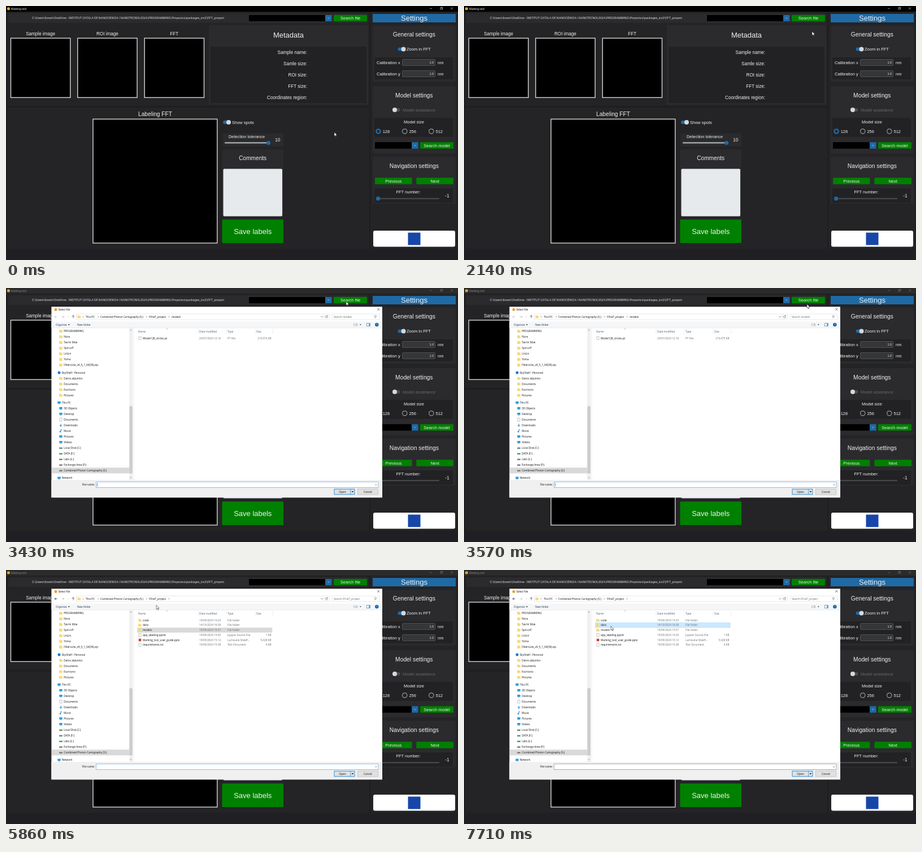
These frames come from a looping animation (800 px wide and 450 px high, 8000 ms). An HTML page:

```html
<!DOCTYPE html>
<html lang="en">
<head>
<meta charset="utf-8">
<title>File selection demo</title>
<style>
html, body { margin: 0; width: 100%; height: 100%; overflow: hidden; background: #1e1e20; }
svg { display: block; width: 800px; height: 450px; }
text { font-family: "Liberation Sans", Arial, sans-serif; white-space: pre; }
.path { font-family: Roboto, sans-serif; }
.dlg text { font-family: "Open Sans", "Noto Sans", sans-serif; }
</style>
</head>
<body>
<svg id="stage" viewBox="0 0 800 450"></svg>
<script>
const ROOT = '#1e1e20', FRAME = '#242426', CARD = '#2b2a2d', INSET = '#222225';
const GREEN = '#008000', BLUE = '#1f6aa5', HOVER = '#144870', ACCENT = '#0078d7', FOCUS = '#5ea9e2';
const LOOP = 8000, STEP = 1000 / 7;

// Shape helpers; edges are given as left, top, right, bottom.
const rect = (l, t, r, b, fill, extra = '') =>
  `<rect x="${l}" y="${t}" width="${r - l}" height="${b - t}" fill="${fill}" ${extra}/>`;
const round = (l, t, r, b, fill, rx = 1.5, extra = '') => rect(l, t, r, b, fill, `rx="${rx}" ${extra}`);
const boxed = (l, t, r, b, fill, stroke, w = 0.6, extra = '') =>
  rect(l, t, r, b, fill, `stroke="${stroke}" stroke-width="${w}" ${extra}`);
const dot = (x, y, r, fill, extra = '') => `<circle cx="${x}" cy="${y}" r="${r}" fill="${fill}" ${extra}/>`;
const line = (d, stroke, w = 0.6) => `<path d="${d}" fill="none" stroke="${stroke}" stroke-width="${w}"/>`;
const label = (x, y, s, size = 7.5, anchor = 'start', fill = '#f0f0f0', extra = '') =>
  `<text x="${x}" y="${y}" font-size="${size}" text-anchor="${anchor}" fill="${fill}" ${extra}>${s}</text>`;
const mid = (x, y, s, size, fill) => label(x, y, s, size, 'middle', fill);
const group = (id, body, extra = '') => `<g id="${id}" ${extra}>${body}</g>`;
const chevron = (x, y, stroke, w = 0.7, s = 1.6) => line(`M${x - s} ${y - s / 2}l${s} ${s}l${s} ${-s}`, stroke, w);

const button = (l, t, r, b, s, size = 7.5, extra = '') =>
  round(l, t, r, b, GREEN, 1.5, extra) + mid((l + r) / 2, (t + b) / 2 + size * 0.36, s, size);
const combo = (l, t, r, b) =>
  rect(l, t, r - 11.5, b, '#000') + rect(r - 11.5, t, r, b, BLUE) + chevron(r - 5.7, (t + b) / 2, '#dce4ee');
const toggle = (x, y, on) =>
  round(x, y - 3, x + 13, y + 3, on ? BLUE : '#4a4d50', 3) + dot(on ? x + 10 : x + 3.5, y, 4, '#d5d9de');
const imageBox = (l, t, r, b) => boxed(l, t, r, b, '#000', '#d8d8d8', 1.4);
const radio = (x, s, on) =>
  dot(x, 222, on ? 3.6 : 4.2, 'none', `stroke="${on ? BLUE : '#949a9f'}" stroke-width="${on ? 2.4 : 1.2}"`) +
  label(x + 7.7, 224.7, s);

function titleBar() {
  return rect(0, 0, 800, 10, '#000', 'id="bar"') + dot(4.5, 4.8, 2.6, '#f0a020') +
    group('title', label(9, 6.7, 'Marking tool', 5, 'start', 'currentColor') +
      line('M750 4.5h4M768.7 3.2h3v3h-3zM769.7 3.2v-1h3v3h-1M787 2.3l4 4M791 2.3l-4 4', 'currentColor', 0.5));
}

function leftSide() {
  const path = 'C:\\Users\\ltoveri\\OneDrive - INSTITUT CATALA DE NANOCIENCIA I NANOTECNOLOGIA' +
    '\\PROGRAMMING\\Proyectos\\packages_icn2\\FFT_proyect';
  let s = round(2, 11, 643, 177, FRAME, 2) + round(2, 180, 643, 430, FRAME, 2) +
    round(4, 13, 641, 30, CARD, 2) + label(46, 23.4, path, 5.35, 'start', '#dedede', 'class="path"') +
    combo(430, 16, 576.5, 27) + button(580, 15.7, 639, 27.3, 'Search file', 7.5, 'id="search"');

  [['Sample image', 8.5], ['ROI image', 126.8], ['FFT', 245.2]].forEach(([name, x]) => {
    s += mid(x + 52.6, 51.7, name, 8.15) + imageBox(x, 57, x + 105.3, 162.2);
  });

  s += round(359, 34, 641, 175, CARD, 2) + rect(362, 72, 638, 172, INSET) + mid(500, 56.2, 'Metadata', 13);
  ['Sample name:', 'Samle size:', 'ROI size:', 'FFT size:', 'Coordinates region:'].forEach((name, i) => {
    s += label(533, 84.7 + 20 * i, name, 8.15, 'end');
  });

  return s + mid(264, 195, 'Labeling FFT', 10.2) + imageBox(154, 200.4, 373.8, 420) +
    toggle(384, 206, true) + label(400, 208.6, 'Show spots') +
    round(383, 226, 491, 248.5, CARD) + mid(426, 234, 'Detection tolerance', 7.45) +
    round(387, 241.3, 468, 243.5, '#aab0b5', 1) + dot(464.5, 242.5, 3.6, BLUE) + mid(480.8, 239.8, '10', 8.2) +
    round(382.5, 254, 491, 374, CARD) + mid(436.7, 273.4, 'Comments', 10.15) +
    round(384.5, 288.6, 489, 372.5, '#e6eaec', 2) +
    button(382.5, 378.3, 491, 420, 'Save labels', 13);
}

function rightSide() {
  const heading = (y, s) => mid(722.3, y, s, 10.3);
  const entry = (y, axis) => label(656, y + 2.5, 'Calibration ' + axis) +
    boxed(701.5, y - 5.5, 759.5, y + 5.5, '#343638', '#565b5e', 0.8, 'rx="1.5"') +
    label(757, y + 2, '1.0', 5.4, 'end') + label(764, y + 2.5, 'nm');
  return rect(645, 11, 799, 430, FRAME) + rect(649, 14, 796, 29, BLUE) + mid(722.5, 25.8, 'Settings', 13) +
    round(649, 35, 796, 134, CARD, 2) + heading(54.4, 'General settings') +
    toggle(693.5, 76.5, true) + label(709, 79.2, 'Zoom in FFT') +
    round(652, 91, 791, 130, INSET) + entry(100, 'x') + entry(120, 'y') +
    round(649, 142, 796, 261, CARD, 2) + heading(161.7, 'Model settings') +
    toggle(684.5, 184, false) + label(702, 186.7, 'Model assistance', 7.5, 'start', '#68686b') +
    round(652, 198, 791, 232, INSET) + mid(722, 208, 'Model size') +
    radio(659, '128', true) + radio(705.7, '256') + radio(752.8, '512') +
    combo(653, 241.3, 729.5, 252.7) + button(733, 241.3, 792, 252.7, 'Search model') +
    round(649, 267, 796, 350, CARD, 2) + heading(286.7, 'Navigation settings') +
    button(653, 304.3, 718.5, 315.7, 'Previous') + button(726.3, 304.3, 792, 315.7, 'Next') +
    round(652, 323, 791, 348.5, INSET) + mid(712, 332.4, 'FFT number:') +
    round(655, 340.2, 767, 342.2, '#4a4d50', 1) + dot(658.5, 341.2, 3.6, BLUE) + mid(781, 338.8, '-1', 8.2) +
    round(650, 398, 795, 426.5, '#fff', 3) + rect(711.5, 401.5, 733.5, 423.5, '#1746a8');
}

// File dialog
const txt = (x, y, s, fill = '#111', anchor = 'start') => label(x, y + 1.7, s, 4.7, anchor, fill);
const folder = (x, y) => `<path d="M${x - 2.8} ${y - 2.6}h2.2l.8 .8h2.6v4.4h-5.6z" fill="#f9d877"/>`;
const page = (x, y) => boxed(x - 2, y - 2.7, x + 2, y + 2.7, '#fff', '#8c8c8c', 0.5);
const drive = (x, y) => rect(x - 2.8, y - 0.8, x + 2.8, y + 1.6, '#777') + rect(x - 2.8, y + 0.6, x + 2.8, y + 1.3, '#3fae63');
const screen = (x, y) => rect(x - 2.7, y - 2.2, x + 2.7, y + 1.5, '#2b9bd8') + rect(x - 1.5, y + 2, x + 1.5, y + 2.5, '#666');

function tree() {
  let s = rect(81, 318.2, 218, 328.4, '#d9d9d9');
  const branch = (names, y, icon) => names.forEach((name, i) => {
    s += icon(97, y + 10 * i) + txt(102.3, y + 10 * i, name);
  });
  const root = (name, y, icon) => { s += icon + txt(98.8, y, name); };
  branch(['PROGRAMMING', 'Nora', 'Tavrin Moe', 'Spin-off', 'LinLin', 'Yoma', 'FiltersLite_v4_5_1_64(36).zip'], 76.4, folder);
  root('SkyShelf - Personal', 150, dot(94, 150, 2.5, '#1879d0'));
  branch(['Datos adjuntos', 'Documents', 'Escritorio', 'Pictures'], 160, folder);
  root('This PC', 203.2, screen(94, 203.2));
  branch(['3D Objects', 'Desktop'], 213.2, screen);
  branch(['Documents'], 233.2, page);
  branch(['Downloads'], 243.2, (x, y) => line(`M${x} ${y - 2.5}v4.5m-2 -2l2 2l2 -2`, ACCENT, 1));
  branch(['Music'], 253.2, (x, y) => dot(x - 1, y + 1.4, 1.2, ACCENT) + line(`M${x} ${y + 1.4}v-4l2 1`, ACCENT, 0.8));
  branch(['Pictures', 'Videos'], 263.2, screen);
  branch(['Local Disk (C:)', 'DATA (F:)', 'Labs (L:)', 'Exchange Area (P:)', 'Combined Photon Cartography (S:)'], 283.3, drive);
  root('Network', 336.7, screen(94, 336.7));
  return s + rect(218, 71, 224.3, 340, '#f0f0f0') + rect(218.3, 209.5, 224, 328.5, '#cdcdcd') +
    chevron(221.2, 336, '#555', 0.7, 1.3) + line('M219.9 75.2l1.3 -1.3l1.3 1.3', '#555', 0.7) + line('M226 71v269', '#e2e2e2');
}

function fileRow(y, icon, name, date, type, size = '') {
  const gray = '#6d6d6d';
  return icon(237, y) + txt(242, y, name) + txt(342, y, date, gray) + txt(392, y, type, gray) + txt(469.5, y, size, gray, 'end');
}

function listings() {
  const rowY = i => 89 + 8.75 * i;
  const mark = (id, i, fill, stroke) => group(id, boxed(232.3, rowY(i) - 4.2, 471, rowY(i) + 4.2, fill, stroke, 0.5));
  const slides = (x, y) => rect(x - 2.3, y - 2.3, x + 2.3, y + 2.3, '#c9472b');
  const rows = [
    [folder, 'code', '19/09/2024 14:25', 'File folder'],
    [folder, 'data', '14/10/2024 16:58', 'File folder'],
    [folder, 'models', '19/09/2024 15:57', 'File folder'],
    [page, 'app_labeling.ipynb', '19/09/2024 14:30', 'Jupyter Source File', '1 KB'],
    [slides, 'Marking_tool_user_guide.pptx', '19/09/2024 15:12', 'Lumivane SlideP...', '5,428 KB'],
    [page, 'requirements.txt', '19/09/2024 15:38', 'Text Document', '4 KB']
  ];
  const search = s => txt(580, 51.2, 'Search ' + s, '#6d6d6d');
  const before = fileRow(89, page, 'Model128_circles.pt', '24/07/2024 12:16', 'PT File', '215,475 KB') +
    txt(293, 51, 'models') + search('models');
  const after = mark('hoverCode', 0, '#e7f5f6', '#d3ecee') + mark('hoverData', 1, '#e5f3ff', '#d5ebff') +
    mark('pickModels', 2, '#d9d9d9', '#d9d9d9') + mark('pickData', 1, '#cce8ff', '#99d1ff') +
    rows.map((r, i) => fileRow(rowY(i), ...r)).join('') + search('FFneT_project');
  return group('before', before) + group('after', after + line('M90.5 51h-4.5m2 -2l-2 2l2 2', '#333', 0.7));
}

function dialog() {
  const crumb = x => line(`M${x - 0.7} 49.6l1.4 1.4l-1.4 1.4`, '#555', 0.6);
  const head = [['Name', 234], ['Date modified', 342], ['Type', 392], ['Size', 443]];
  return rect(80.4, 33.2, 665.9, 371.2, '#fff') +
    dot(88, 38.3, 2.5, '#f0a020') + txt(92.5, 38.2, 'Select file') + line('M657.3 35.8l4 4M661.3 35.8l-4 4', '#222', 0.6) +
    line('M86 51h4.5M88 49l-2 2l2 2M98.5 51h4.5m-2 -2l2 2l-2 2', '#b5b5b5', 0.7) + chevron(110, 51, '#aaa', 0.6, 1.2) +
    line('M119 53.5v-5m-2 2l2 -2l2 2', '#333', 0.7) +
    boxed(124.5, 46, 572.5, 56, '#fff', '#d9d9d9') + boxed(577, 46, 661, 56, '#fff', '#d9d9d9') +
    group('hoverCrumb', boxed(250.8, 46.4, 291.2, 55.6, '#e5f3ff', '#cce8ff') + line('M285.8 46.4v9.2', '#cce8ff')) +
    folder(129.3, 51) + [136.5, 163, 248.5, 288.5].map(crumb).join('') +
    txt(141, 51, 'This PC') + txt(167, 51, 'Combined Photon Cartography (S:)') + txt(253, 51, 'FFneT_project') +
    chevron(559.3, 51, '#444') + line('M563.3 46v10', '#d9d9d9') + line('M569 49.7a2 2 0 1 0 .4 1.8M569.3 48.5v1.6h-1.6', '#444') +
    line('M655.4 50.2a1.6 1.6 0 1 0 -.01 .1M654.8 51.5l-2 2', '#555') +
    rect(80.4, 59.5, 665.9, 70.5, '#f5f6f7') + line('M81 70.7h584', '#dcdcdc') +
    txt(88, 65, 'Organize', '#1e395b') + '<path d="M109.5 64.3h3.6l-1.8 2z" fill="#333"/>' + txt(126, 65, 'New folder', '#1e395b') +
    line('M615 63.3h2M618.3 63.3h4M615 65h2M618.3 65h4M615 66.7h2M618.3 66.7h4', '#888') +
    '<path d="M625.8 64.3h3l-1.5 1.8z" fill="#333"/>' + boxed(638.3, 62.7, 644.3, 67.4, '#fff', '#1b6fb5') +
    rect(642, 62.7, 644.3, 67.4, '#5ea5dc') + dot(656.3, 65, 3.2, '#0a64b4') + mid(656.3, 66.8, '?', 5, '#fff') +
    tree() + head.map(([s, x]) => txt(x, 76.8, s, '#4c607a')).join('') +
    line('M340 72v9.5M390 72v9.5M441 72v9.5M472.3 72v9.5', '#e2e2e2') + line('M283.4 73l1.5 -1.3l1.5 1.3', '#777', 0.5) +
    listings() + rect(80.4, 340, 665.9, 371.2, '#f0f0f0') + txt(157, 348.5, 'File name:', '#111', 'end') +
    boxed(159.3, 343.7, 659, 353.4, '#fff', FOCUS, 0.7, 'id="field"') + chevron(655, 348.6, '#444') +
    group('caret', line('M161.5 345.5v6', '#111', 0.5)) +
    boxed(581, 356.2, 617, 365.8, '#e1e1e1', ACCENT, 0.8) + line('M609.8 356v10', ACCENT) +
    '<path d="M611.6 360h3.6l-1.8 2.2z" fill="#111"/>' + mid(595.5, 362.8, 'Open', 4.8, '#111') +
    boxed(622.3, 356, 658.6, 366, '#e1e1e1', '#adadad') + mid(640.4, 362.8, 'Cancel', 4.8, '#111');
}

const arrow = '<path d="M0 0V7.2L1.7 5.7 2.8 8.3 3.9 7.8 2.8 5.3H5.1Z" fill="#fff" stroke="#000" stroke-width=".5"/>';
document.getElementById('stage').innerHTML = rect(0, 0, 800, 450, ROOT) + leftSide() + rightSide() +
  rect(0, 430, 800, 450, '#1f1f24') + titleBar() + group('dialog', dialog(), 'class="dlg"') +
  group('busy', dot(599, 22.3, 3.3, 'none', 'stroke="#2f86e0" stroke-width="1.5"')) + group('cursor', arrow);

const el = id => document.getElementById(id);
const show = (id, on) => el(id).setAttribute('visibility', on ? 'inherit' : 'hidden');

// Pointer stops: time, x, y
const stops = [[0, 581, 223.5], [1140, 596, 142], [1290, 597, 141], [2140, 616, 45], [2430, 627, 22],
  [2860, 597, 19], [3290, 597, 19], [3570, 607, 28.5], [3860, 607, 28.5], [4860, 267.5, 51.5],
  [5570, 267.5, 51.5], [6430, 262, 93.5], [6570, 262, 93.5], [7430, 260, 99.5], [LOOP, 260, 99.5]];

function pointer(t) {
  const i = stops.findIndex(s => s[0] > t);
  const [t0, x0, y0] = stops[i - 1], [t1, x1, y1] = stops[i];
  const p = (t - t0) / (t1 - t0), e = p * p * (3 - 2 * p);
  return [x0 + (x1 - x0) * e, y0 + (y1 - y0) * e];
}

function draw(now) {
  const t = Math.floor((now % LOOP + 4) / STEP) % 56 * STEP;
  const since = a => t >= a - 10;
  const within = (a, b) => since(a) && !since(b);
  const inactive = since(3290), moved = since(5570), picked = since(7290), busy = within(3290, 3430);
  el('bar').setAttribute('fill', inactive ? '#2b2b2b' : '#000');
  el('title').setAttribute('color', inactive ? '#858585' : '#f2f2f2');
  el('search').setAttribute('fill', within(2290, 3430) ? HOVER : GREEN);
  el('field').setAttribute('stroke', picked ? '#8a8a8a' : FOCUS);
  // Nested parts inherit, so a hidden parent keeps them hidden.
  show('dialog', since(3430));
  show('before', !moved);
  show('after', moved);
  show('caret', !moved);
  show('hoverCrumb', within(4860, 5860));
  show('hoverCode', within(6430, 6860));
  show('hoverData', within(6860, 7290));
  show('pickModels', !picked);
  show('pickData', picked);
  show('busy', busy);
  show('cursor', !busy);
  el('cursor').setAttribute('transform', `translate(${pointer(t)})`);
  requestAnimationFrame(draw);
}
requestAnimationFrame(draw);
</script>
</body>
</html>
```
